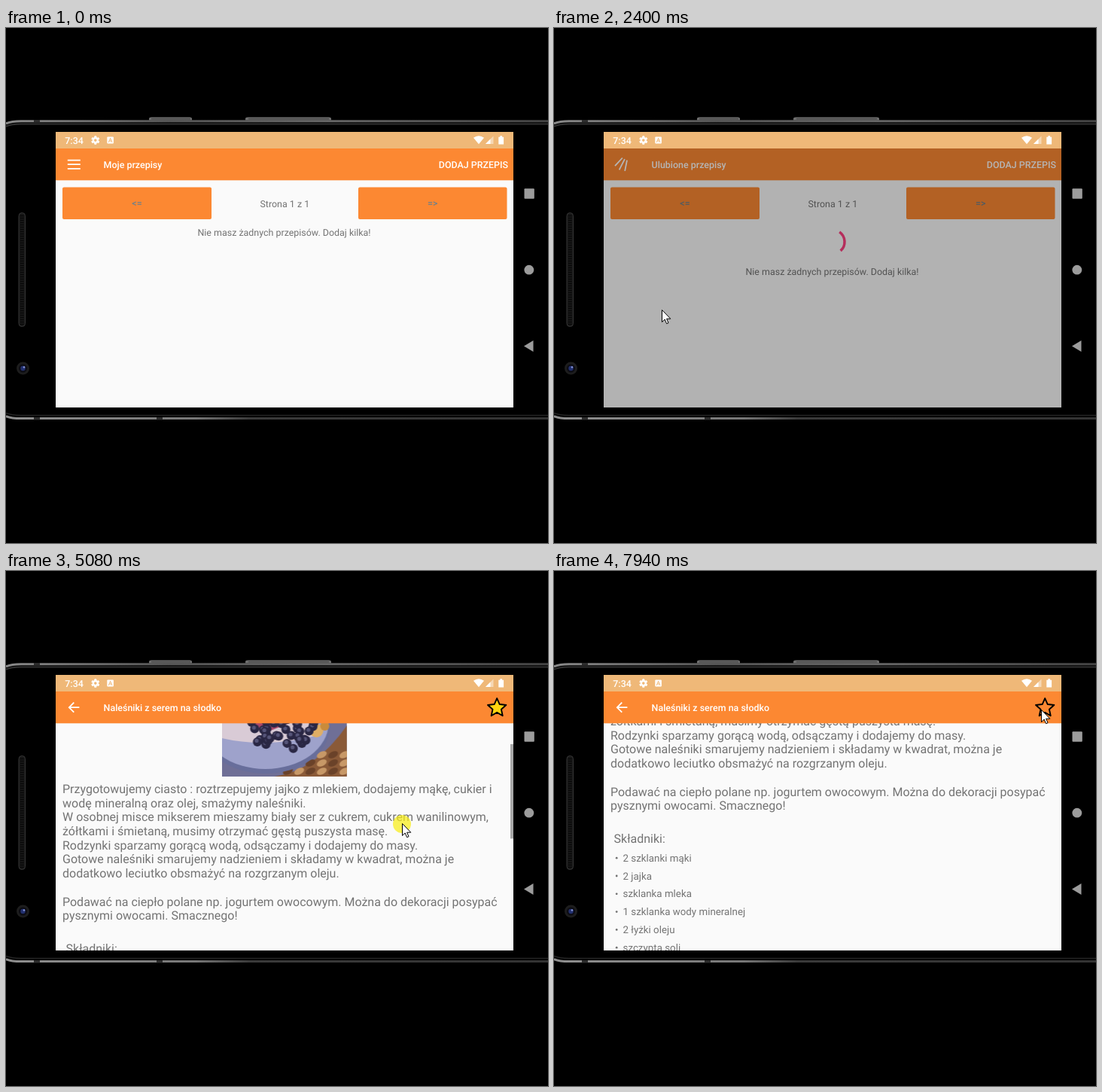
These frames come from a looping animation (720x684 px, 8 s). An HTML page:

```html
<!DOCTYPE html>
<html lang="pl">
<head>
<meta charset="utf-8">
<title>Przepisy</title>
<style>
html, body { margin: 0; width: 100%; height: 100%; overflow: hidden; background: #000; }
svg { display: block; width: 100vw; height: 100vh; }
text { font: 12.45px Roboto, sans-serif; fill: rgba(0,0,0,.54); white-space: pre; text-rendering: geometricPrecision; }
.mid { text-anchor: middle; }
.end { text-anchor: end; }
.white { fill: #fff; font-weight: 500; }
.sign { fill: #70808a; font-weight: 500; }
.menu { font-size: 17.78px; }
.hello { font-size: 19.56px; }
.body { font-size: 16px; }
.item { font-size: 13.33px; }
</style>
</head>
<body>
<svg id="stage" viewBox="0 0 720 684" preserveAspectRatio="none"></svg>
<script>
const ORANGE = '#fc8832', PAGE = '#fafafa';

const rect = (x, y, w, h, fill, extra = '') =>
  `<rect x="${x}" y="${y}" width="${w}" height="${h}" fill="${fill}" ${extra}/>`;
const circle = (x, y, r, fill, extra = '') =>
  `<circle cx="${x}" cy="${y}" r="${r}" fill="${fill}" ${extra}/>`;
const path = (d, fill, extra = '') => `<path d="${d}" fill="${fill}" ${extra}/>`;
const text = (x, y, s, cls = '', extra = '') =>
  `<text x="${x}" y="${y}" class="${cls}" ${extra}>${s.replace(/</g, '&lt;')}</text>`;
const group = (id, inner, extra = '') => `<g id="${id}" ${extra}>${inner}</g>`;
const times = (n, f) => Array.from({ length: n }, (_, i) => f(i)).join('');

let seed = 7;
const rnd = () => (seed = seed * 16807 % 2147483647) / 2147483647;

function starPath(cx, cy, R, r) {
  const pts = Array.from({ length: 10 }, (_, i) => {
    const a = (i / 5 - .5) * Math.PI, d = i % 2 ? r : R;
    return (cx + d * Math.cos(a)).toFixed(2) + ' ' + (cy + d * Math.sin(a)).toFixed(2);
  });
  return 'M' + pts.join('L') + 'Z';
}

function phone() {
  return path('M0 127Q7 123.800 20 123.700H720', 'none', 'stroke="url(#edge)" stroke-width="3"') +
    path('M0 130.500Q7 127.500 20 127.500H720', 'none', 'stroke="#303030" stroke-width="2"') +
    path('M0 515.500Q7 518.600 20 518.600H720', 'none', 'stroke="url(#edge2)" stroke-width="3"') +
    path('M0 511.500Q8 514.500 20 514.500H720', 'none', 'stroke="#242424" stroke-width="1.4"') +
    path('M190 122.500v-2q0-2 3-2h51q3 0 3 2v2zM318 122.500v-2q0-2 3-2h108q3 0 3 2v2z', '#6d6d6d') +
    path('M193 120.800h52M322 120.800h107', 'none', 'stroke="#3c3c3c"') +
    [[37, 122], [200, 517], [37, 517]].map(([x, y]) => rect(x, y, 8, 3.5, '#2c2c2c')).join('') +
    rect(17, 245.5, 8.5, 151, '#161616', 'rx="4" stroke="#363636"') +
    times(49, i => rect(19, 249 + i * 3, 4.5, 1, '#070707')) +
    circle(22.5, 452, 8.5, '#1d1d1d') + circle(22.5, 452, 5.5, '#0c0c14') +
    circle(22.5, 452, 3.2, '#22306f') + circle(24, 450.5, 1.3, '#8795d8') +
    rect(688.5, 213.3, 13.3, 13.4, '#9c9c9c', 'rx="1"') + circle(694.8, 321.2, 6.4, '#9c9c9c') +
    path('M688 422.500L700.500 415V430Z', '#9c9c9c');
}

function statusBar() {
  const teeth = times(6, i => rect(117.4, 143.6, 2.8, 11, '#fff', `rx=".6" transform="rotate(${i * 60} 118.8 149.1)"`));
  return rect(66, 138, 608, 22, '#efb878') + text(78.3, 153.8, '7:34', 'white') +
    teeth + circle(118.8, 149.1, 4, '#fff') + circle(118.8, 149.1, 1.8, '#efb878') +
    rect(134.3, 144.6, 8.6, 8.9, '#fff', 'rx="1"') +
    path('M136.300 151.800L138.600 146.300L140.900 151.800M137.200 150h2.800', 'none', 'stroke="#efb878"') +
    path('M621 145.800Q628 140.800 635 145.800L628 154.200Z', '#fff') +
    path('M637 154L647.500 143.500V154Z', '#fff', 'opacity=".45"') +
    path('M637 154L643.500 147.500V154Z', '#fff') +
    path('M654.300 144.800h2v-1.500h2.800v1.500h2v9.700h-6.800z', '#fff');
}

// Food pictures as flat shapes
function pancakes() {
  let s = rect(0, 0, 166.5, 133, '#6f6f96') + rect(0, 0, 60, 50, '#c3c6d6') +
    path('M70 133Q125 125 166.500 65V133Z', '#8a5a38');
  s += times(18, i => {
    const x = 88 + i % 6 * 15, y = 104 + (i / 6 | 0) * 11;
    return `<ellipse cx="${x}" cy="${y}" rx="7" ry="4" fill="${i % 2 ? '#c79867' : '#6a4229'}" transform="rotate(-25 ${x} ${y})"/>`;
  });
  s += `<ellipse cx="58" cy="66" rx="86" ry="63" fill="#686e9b"/><ellipse cx="58" cy="62" rx="84" ry="61" fill="#9ea2cb"/>` +
    path('M0 50Q50 0 130 25L128 78Q60 96 0 82Z', '#d9cbd6') +
    path('M20 45L110 15 120 50 55 76Z', '#a8486b') + circle(126, 72, 9, '#dfae65') + circle(137, 66, 6, '#c98b3b');
  return s + times(75, () => {
    const a = rnd() * 2 * Math.PI, d = Math.sqrt(rnd());
    const x = 78 + 46 * d * Math.cos(a), y = 62 + 37 * d * Math.sin(a);
    return circle(x, y, 6, '#2a2744') + circle(x - 1, y - 1.5, 2.6, '#565579');
  });
}
const cheesecake = rect(0, 0, 63, 47, '#5a5058') + circle(9, 20, 10, '#b9a59c') + circle(52, 5, 10, '#6d7a98') +
  `<ellipse cx="36" cy="37" rx="32" ry="11" fill="#c9c3cd"/>` +
  path('M18 21L44 12 56 22 52 38 25 39Z', '#ecd9a4') + path('M18 21L44 12 56 22 30 27Z', '#a9692f');
const pavlova = rect(0, 0, 63, 41, '#8d8c70') + rect(0, 29, 63, 12, '#d4d0ca') +
  times(3, i => `<ellipse cx="${11 + i * 21}" cy="25" rx="10" ry="10" fill="#efe5d3"/>` +
    circle(9 + i * 21, 12, 4, '#b63b48') + circle(15 + i * 21, 13, 3, '#d89a3a') + circle(4 + i * 22, 35, 4, '#b8404c'));

const button = (x, y, w, h, label, cls) =>
  rect(x, y, w, h, ORANGE, 'rx="2"') + text(x + w / 2, y + h / 2 + 4.4, label, cls + ' mid');

function listRows() {
  const names = ['Naleśniki z serem na słodko', 'Sernik', 'Mini pavlova'];
  return group('picked', rect(75, 263.2, 590, 74.5, ORANGE) + rect(78, 265.5, 584.5, 70, PAGE, 'rx="9"')) +
    names.map((n, i) => text(153.8, 293.4 + i * 75, n, 'menu')).join('') +
    group('thumbs',
      `<use href="#plate" transform="translate(86 275.5) scale(.376 .383)"/>` +
      `<g transform="translate(86 352)">${cheesecake}</g><g transform="translate(86 430.5)">${pavlova}</g>`);
}

function recipe() {
  const lines = [
    'Przygotowujemy ciasto : roztrzepujemy jajko z mlekiem, dodajemy mąkę, cukier i',
    'wodę mineralną oraz olej, smażymy naleśniki.',
    'W osobnej misce mikserem mieszamy biały ser z cukrem, cukrem wanilinowym,',
    'żółtkami i śmietaną, musimy otrzymać gęstą puszysta masę.',
    'Rodzynki sparzamy gorącą wodą, odsączamy i dodajemy do masy.',
    'Gotowe naleśniki smarujemy nadzieniem i składamy w kwadrat, można je',
    'dodatkowo leciutko obsmażyć na rozgrzanym oleju.', '',
    'Podawać na ciepło polane np. jogurtem owocowym. Można do dekoracji posypać',
    'pysznymi owocami. Smacznego!'];
  const items = ['2 szklanki mąki', '2 jajka', 'szklanka mleka', '1 szklanka wody mineralnej',
    '2 łyżki oleju', 'szczypta soli'];
  return group('loaded',
    `<use id="photo" href="#plate" x="286.5" y="206"/>` +
    lines.map((s, i) => text(75, 360.8 + i * 18.72, s, 'body')).join('') +
    items.map((s, i) => circle(83.2, 593.2 + i * 23.8, 1.4, '#737373') + text(91.5, 597.8 + i * 23.8, s, 'item')).join('')) +
    text(79.6, 572.6, 'Składniki:', 'body', 'id="heading"');
}

function drawer() {
  const rows = ['Moje przepisy', 'Odkrywaj przepisy', 'Ulubione przepisy', 'O aplikacji'];
  return rect(66, 160, 284, 344, PAGE) + text(75, 190, 'Witaj stół2', 'hello') +
    button(75, 209.7, 266.7, 42.3, 'WYLOGUJ', 'white') +
    rows.map((s, i) => rect(66, 308.6 + i * 42.3, 284, 1, '#eee')).join('') +
    rect(66, 266.5, 284, 42.5, '#f27b00', 'id="current"') +
    rows.map((s, i) => text(74.7, 294.4 + i * 42.3, s, 'menu')).join('');
}

document.getElementById('stage').innerHTML = `<defs>
  <linearGradient id="edge" gradientUnits="userSpaceOnUse" x1="0" x2="720"><stop stop-color="#8a8a8a"/>
    <stop offset=".3" stop-color="#555"/><stop offset=".6" stop-color="#666"/><stop offset="1" stop-color="#444"/></linearGradient>
  <linearGradient id="edge2" gradientUnits="userSpaceOnUse" x1="0" x2="720"><stop stop-color="#8f8f8f"/>
    <stop offset=".35" stop-color="#777"/><stop offset=".45" stop-color="#3a3a3a"/><stop offset="1" stop-color="#333"/></linearGradient>
  <clipPath id="pageClip">${rect(66, 202, 608, 302, '#000')}</clipPath>
  <clipPath id="appClip">${rect(66, 160, 608, 344, '#000')}</clipPath>
  <clipPath id="plateClip">${rect(0, 0, 166.5, 133, '#000')}</clipPath>
  <g id="plate" clip-path="url(#plateClip)">${pancakes()}</g></defs>` +
  phone() + rect(66, 138, 608, 366, PAGE) +
  group('page',
    group('list',
      button(75, 211.5, 198, 42.5, '<=', 'sign') + button(468, 211.5, 197.5, 42.5, '=>', 'sign') +
      text(370.3, 237.7, 'Strona 1 z 1', 'mid') +
      text(369.5, 276.2, 'Nie masz żadnych przepisów. Dodaj kilka!', 'mid', 'id="empty"') +
      path('M379.200 270.900A16 16 0 0 1 380.700 295.900', 'none', 'id="spinner" stroke="#ff4081" stroke-width="3.500"') +
      group('rows', listRows())) +
    group('detail', recipe()) + rect(670, 202.5, 4, 125.5, '#a8a8a8', 'id="thumb"'),
    'clip-path="url(#pageClip)"') +
  group('app',
    rect(66, 160, 608, 42.3, ORANGE) +
    path('', 'none', 'id="icon" stroke="#fff" stroke-width="1.8"') +
    text(129.6, 185.7, '', 'white', 'id="title"') + text(667, 185.7, 'DODAJ PRZEPIS', 'white end', 'id="add"') +
    circle(652.5, 181, 0, 'rgba(0,0,0,.13)', 'id="ripple"') +
    path(starPath(652.2, 181.9, 12.8, 6), '#ffd40f', 'id="star" stroke="#000" stroke-width="1.9" stroke-linejoin="round"') +
    rect(66, 160, 608, 344, '#000', 'id="scrim"') + group('drawer', drawer()),
    'clip-path="url(#appClip)"') +
  statusBar() +
  group('cursor', circle(0, 1, 12, '#f8ec10', 'id="press" opacity=".7"') +
    path('M.5.500V16.500L4.200 13 6.600 18.700 9 17.700 6.600 12.200H11.800Z', '#fff', 'stroke="#000"'));

const el = {};
document.querySelectorAll('[id]').forEach(e => el[e.id] = e);
const set = (id, name, v) => el[id].setAttribute(name, v);
const show = (id, on) => set(id, 'visibility', on ? 'inherit' : 'hidden');

// Linear interpolation in rows of [tick, ...values]
function at(k, rows) {
  if (k <= rows[0][0]) return rows[0].slice(1);
  const i = rows.findIndex(r => r[0] > k);
  if (i < 0) return rows[rows.length - 1].slice(1);
  const a = rows[i - 1], b = rows[i], f = (k - a[0]) / (b[0] - a[0]);
  return a.slice(1).map((v, j) => v + (b[j + 1] - v) * f);
}

const CURSOR = [[1, 4, 233], [9, 87, 179], [10, 87, 179], [14, 102, 228], [18, 135, 304], [20, 140, 374],
  [22, 143, 374], [30, 143, 374], [35, 370, 285], [39, 513, 298], [44, 513, 298], [48, 512, 372],
  [50, 512, 420], [51, 512, 420], [53, 521, 395], [55, 526, 335], [60, 527, 240], [63, 528, 222],
  [65, 528, 200], [71, 528, 200], [78, 645, 190], [79, 647, 184]];
const ICON = [[10, 0], [14, 1], [23, 1], [26, .35], [28, 0], [40, 0], [42, .65], [44, 1]];
const DRAWER = [[10, -284], [11, -200], [12, -80], [13, -15], [14, 0], [23, 0], [24, -70], [25, -200], [26, -284]];
const SCRIM = [[10, 0], [13, .58], [14, .6], [23, .6], [26, .29], [28, 0]];
const FADE = [[40, 0], [41, .25], [42, .59], [43, .85], [44, 1]];

// Menu bars (p = 0) turning into a back arrow (p = 1)
function iconPath(p) {
  const mix = (a, b) => a + (b - a) * p;
  const shaft = mix(17, 14.2), arm = mix(17, 10), off = mix(5.6, -.6), a = p * Math.PI / 4, x = -shaft / 2;
  const w = arm * Math.cos(a), h = arm * Math.sin(a);
  return `M${x} 0h${shaft}M${x} ${off}l${w} ${h}M${x} ${-off}l${w} ${-h}`;
}

const zoom = s => `translate(370 353) scale(${s}) translate(-370 -353)`;

function draw(t) {
  const k = Math.floor((t + 14) / 92.3);
  const [x, y] = at(k, CURSOR), [p] = at(k, ICON), [fade] = at(k, FADE);
  const loaded = k >= 44, busy = k >= 25 && k < 28;

  show('cursor', k >= 1);
  set('cursor', 'transform', `translate(${x} ${y})`);
  show('press', [10, 22, 40].includes(k) || (k >= 52 && k < 70) || (k >= 81 && k < 84));

  set('icon', 'd', iconPath(p));
  set('icon', 'transform', `translate(90.300 181.200) rotate(${(k > 14 && k < 30 ? 180 : -180) * (1 - p)})`);
  el.title.textContent = k < 25 ? 'Moje przepisy' : k < 41 ? 'Ulubione przepisy' : loaded ? 'Naleśniki z serem na słodko' : '';
  show('add', k < 41);
  show('star', k >= 45);
  set('star', 'fill', k < 86 ? '#ffd40f' : 'none');
  set('ripple', 'r', k < 86 ? at(k, [[80, 0], [84, 18.5]])[0] : 0);

  set('drawer', 'transform', `translate(${at(k, DRAWER)[0]} 0)`);
  set('current', 'y', k < 23 ? 266.5 : 351.1);
  set('scrim', 'opacity', at(k, SCRIM)[0]);

  set('list', 'opacity', 1 - fade);
  set('list', 'transform', zoom(1 - .034 * fade));
  show('empty', k < 28);
  set('empty', 'y', busy ? 327.8 : 276.2);
  show('spinner', busy);
  set('spinner', 'transform', `rotate(${(k - 26) * 70} 370 284)`);
  show('rows', k >= 28);
  show('thumbs', k >= 32);
  show('picked', k >= 40);

  const scroll = k < 53 ? 0 : k < 70 ? 401 - y : at(k, [[69, 201], [72, 212]])[0];
  set('detail', 'opacity', fade);
  set('detail', 'transform', `translate(0 ${-scroll}) ` + zoom(1 + .073 * (1 - fade)));
  show('loaded', loaded);
  show('photo', k >= 46);
  set('heading', 'y', loaded ? 572.6 : 407);
  set('thumb', 'y', 202.5 + scroll * .416);
  set('thumb', 'opacity', at(k, [[52, 0], [53, 1], [74, 1], [77, 0]])[0]);
}

const start = performance.now();
function loop() {
  draw((performance.now() - start) % 8000);
  requestAnimationFrame(loop);
}
loop();
</script>
</body>
</html>
```
